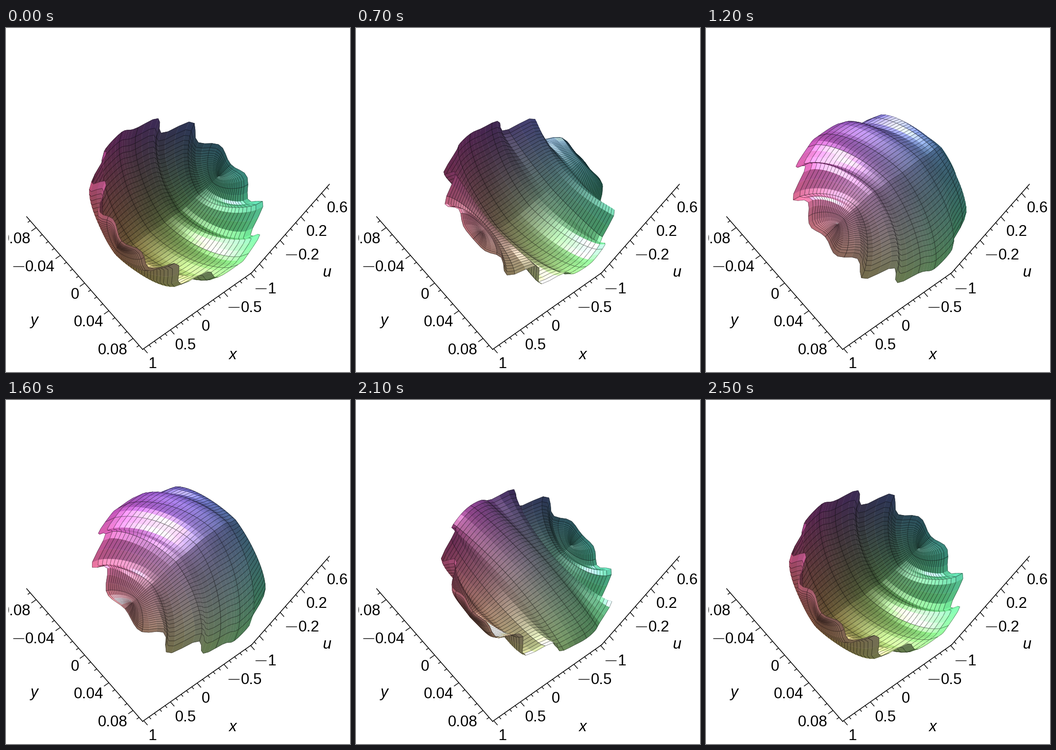
A matplotlib script that plays this animation: 700x700 px, repeating every 2600 ms.

```python
import numpy as np
import matplotlib.pyplot as plt
from matplotlib.animation import FuncAnimation
from matplotlib.collections import LineCollection, PolyCollection
from matplotlib.patches import Rectangle

SIZE, FRAMES, STEP, PERIOD = 700, 26, 100, 2500
plt.rcParams["font.family"] = "Liberation Sans"

fig = plt.figure(figsize=(7, 7), dpi=100, facecolor="white")
ax = fig.add_axes([0, 0, 1, 1])
ax.axis("off")

# Half edges of the plot box in view space: right, down, towards the viewer.
EX = np.array([-111.0, 78.0, 117.5])
EY = np.array([118.0, 135.0, 21.0])
EU = np.array([79.0, -90.0, 134.5])
CENTER = np.array([350.0, 351.0, 0.0])


def unit(v):
    length = np.linalg.norm(v, axis=-1, keepdims=True)
    return v / np.maximum(length, 1e-9)


LIGHT = unit(np.array([-0.60, -0.72, 0.30]))
HALF = unit(LIGHT + np.array([0, 0, 1.0]))

# Elliptic grid: flat rings m crossed by lines of constant angle.
ANGLES, RINGS, EVERY = 100, 20, 5
nu, m = np.meshgrid(np.linspace(-np.pi, np.pi, ANGLES + 1),
                    np.linspace(0, 1, RINGS + 1), indexing="ij")
X = np.cos(nu) * (0.93 + 0.07 * m**2)
Y = m * np.sin(nu)
DOME = 0.96 * np.clip(1 - X**2 - Y**2, 0, 1) ** 0.65 * (1 - 0.15 * m)
LEAD = 1.1 * X**2 - 2 * np.pi * 285 / PERIOD

# Ripples run from both ends of the long axis towards its middle.
FROM_MIDDLE = 14 * np.arcsin(np.abs(np.cos(nu)))
FADE = 0.25 + 0.75 * m**2
EVEN = FADE * (0.05 + 0.14 * np.abs(np.sin(2 * nu)) ** 3) * np.cos(FROM_MIDDLE)
ODD = FADE * 0.19 * np.sin(2 * nu) ** 2 * np.sin(FROM_MIDDLE)

# Each cell draws its face, two ring edges and, on some cells, angle edges.
column = np.repeat(np.arange(ANGLES), RINGS)
SHOWN = np.ones((ANGLES * RINGS, 5), bool)
SHOWN[:, 3] = column % EVERY == 0
SHOWN[:, 4] = column % EVERY == EVERY - 1
WIDTHS = np.tile([0.45, 0.58, 0.58, 0.58, 0.58], (ANGLES * RINGS, 1))


def surface(t):
    phase = 2 * np.pi * t / PERIOD
    turn = phase - np.radians(18)
    wave = EVEN * np.cos(turn) - ODD * np.sin(turn)
    return wave - DOME * np.cos(phase + LEAD)


def cell_mean(a):
    return ((a[:-1, :-1] + a[1:, :-1] + a[1:, 1:] + a[:-1, 1:]) / 4).ravel()


def shade(quads, u):
    normal = unit(np.cross(quads[:, 2] - quads[:, 0], quads[:, 3] - quads[:, 1]))
    normal *= np.where(normal[:, 2:] < 0, -1, 1)
    tint = np.stack([cell_mean(a) for a in (X, Y, u)], axis=1)
    base = 0.27 + 0.68 * (tint + 1) / 2
    diffuse = np.clip(normal @ LIGHT, 0, 1)[:, None] ** 1.2
    shine = np.clip(normal @ HALF, 0, 1)[:, None] ** 16
    return np.clip(base * (0.52 + 0.58 * diffuse) + 0.55 * shine, 0, 1)


def draw(frame):
    u = surface(frame * STEP)
    p = CENTER + X[..., None] * EX + Y[..., None] * EY + u[..., None] * EU
    quads = np.stack([p[:-1, :-1], p[1:, :-1], p[1:, 1:], p[:-1, 1:]],
                     axis=2).reshape(-1, 4, 3)
    order = np.argsort(quads[..., 2].mean(axis=1))
    corners = [[0, 1, 2, 3], [0, 0, 1, 1], [3, 3, 2, 2], [0, 0, 3, 3], [1, 1, 2, 2]]
    shapes = quads[order][:, corners, :2]
    count = len(quads)
    faces = np.zeros((count, 5, 4))
    edges = np.zeros((count, 5, 4))
    faces[:, 0, :3] = edges[:, 0, :3] = shade(quads, u)[order]
    faces[:, 0, 3] = edges[:, 0, 3] = 1
    edges[:, 1:, 3] = 0.5
    shown = SHOWN[order]
    mesh.set_verts(shapes[shown], closed=False)
    mesh.set_facecolor(faces[shown])
    mesh.set_edgecolor(edges[shown])
    mesh.set_linewidth(WIDTHS[shown])
    return (mesh,)


def write(x, y, label, ha="left", **style):
    ax.text(x, y, label, ha=ha, va="baseline", fontsize=22.3, **style)


def number(x, y, value, align="left"):
    """Write a tick number with a long thin minus, centred on height y."""
    label = f"{abs(value):g}"
    if align == "right":
        write(x + 1, y + 11, label, ha="right")
        dash = x - 84
    else:
        dash = x
        write(x + (24.5 if value < 0 else -1), y + 11, label)
    if value < 0:
        ax.plot([dash, dash + 21], [y + 1, y + 1], color="black", lw=1.0)


def ticks(mid, half, reach, step, every, first, out):
    """Ticks along an axis; every n-th one, counted from first, is long."""
    segments = []
    top = int(reach / step + 1e-6)
    for k in range(-top, top + 1):
        start = mid + half * (k * step / reach)
        length = 12 if (k - first) % every == 0 else 6
        segments.append([start, start + length * out])
    ax.add_collection(LineCollection(segments, colors="black", linewidths=1.0))


ex, ey, eu = EX[:2], EY[:2], EU[:2]
origin = CENTER[:2]
x_mid, y_mid, u_mid = origin + ey - eu, origin + ex - eu, origin - ex + ey
for mid, half in ((x_mid, ex), (y_mid, ey), (u_mid, eu)):
    ax.plot(*np.transpose([mid - half, mid + half]), color="black", lw=1.1)

X_REACH, Y_REACH, U_REACH = 1.02, 0.0958, 0.75
ticks(x_mid, ex, X_REACH, 0.1, 5, 0, unit(ey))
ticks(y_mid, ey, Y_REACH, 0.01, 4, 0, unit(ex))
ticks(u_mid, eu, U_REACH, 0.1, 4, 2, unit(ey))

for v in (1, 0.5, 0, -0.5, -1):
    number(*(x_mid + ex * v / X_REACH + (10, 29)), v)
for v in (-0.08, -0.04, 0, 0.04, 0.08):
    number(*(y_mid + ey * v / Y_REACH + (-12, 21)), v, align="right")
for v in (-0.2, 0.2, 0.6):
    number(*(u_mid + eu * v / U_REACH + (12, 28)), v)
for x, y, name in ((461, 674, "x"), (57, 604, "y"), (653, 506, "u")):
    write(x, y, name, ha="center", style="italic")
ax.add_patch(Rectangle((0, 0), 5, SIZE, color="white", lw=0, zorder=9))

mesh = PolyCollection([], closed=False, zorder=3)
ax.add_collection(mesh, autolim=False)
ax.set(xlim=(0, SIZE), ylim=(SIZE, 0))
draw(0)

animation = FuncAnimation(fig, draw, frames=FRAMES, interval=STEP,
                          repeat=True, repeat_delay=0, blit=False)
plt.show()
```
